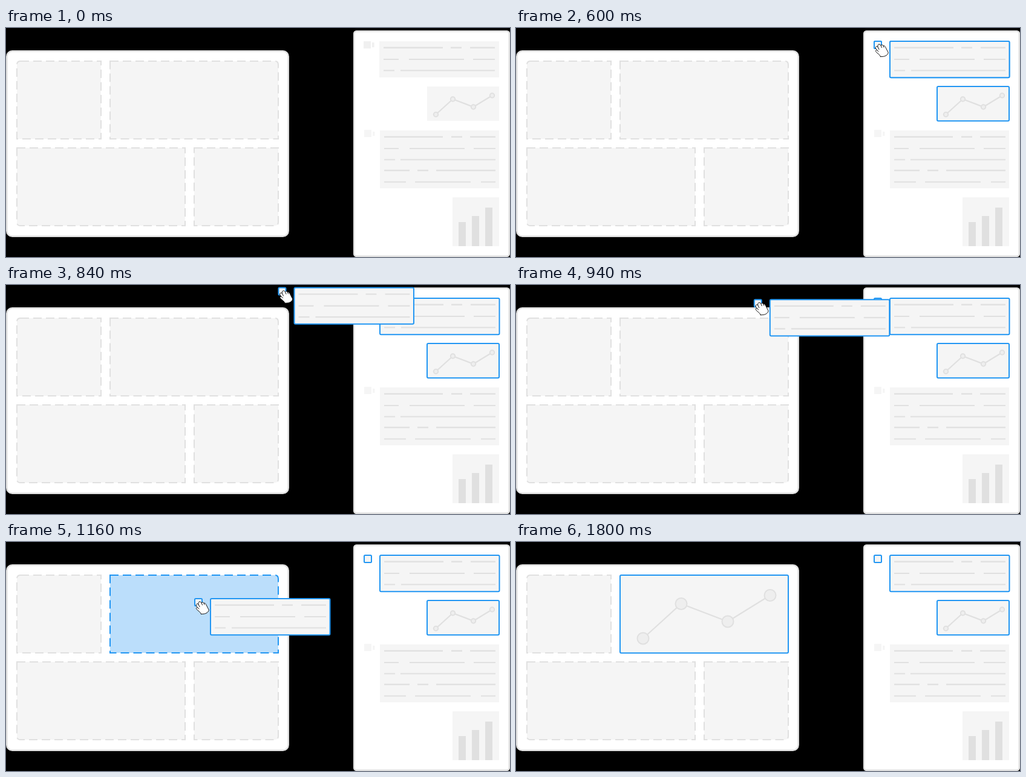
An HTML page that plays this animation: 833x380 px, repeating every 2.24 s.

```html
<!DOCTYPE html>
<html lang="en">
<head>
<meta charset="utf-8">
<title>Drag a chart into a layout</title>
<style>
  html, body { margin: 0; width: 100%; height: 100%; overflow: hidden; background: #000; }
  svg { display: block; width: 833px; height: 380px; }
  .panel { fill: #fff; stroke: #e0e0e0; stroke-width: 2.5; }
  .fill { fill: #f5f5f5; }
  .line { fill: none; stroke: #e0e0e0; stroke-width: 2.2; }
  .slot { fill: #f5f5f5; stroke: #e0e0e0; stroke-width: 2; stroke-dasharray: 14 7; }
  .slot.target { fill: #bbdefb; stroke: #2196f3; }
  .selected { fill: #f5f5f5; stroke: #2196f3; stroke-width: 2; }
  .node { fill: #eee; stroke: #e0e0e0; stroke-width: 2; }
  .bar { fill: #e0e0e0; }
  .hand { fill: #fff; stroke: #111; stroke-width: 1; stroke-linejoin: round; stroke-linecap: round; }
</style>
</head>
<body>
<svg viewBox="0 0 833 380">
  <defs>
    <path id="route" d="M0 0Q-170 -65 -280 72"/>
    <path id="textShort" class="line" d="M624 32.7h98m13 0h18m14 0h41M624 52h25m17 0h91m15 0h36M624 70.5h18m10 0h156"/>
    <g id="smallChart">
      <path class="line" d="M710.5 143.5L738.5 118L772.5 131L803.5 112"/>
      <g class="node">
        <circle cx="710.5" cy="143.5" r="3.7"/><circle cx="738.5" cy="118" r="3.7"/>
        <circle cx="772.5" cy="131" r="3.7"/><circle cx="803.5" cy="112" r="3.7"/>
      </g>
    </g>
    <g id="bundle">
      <rect class="selected" x="592" y="22" width="12" height="12" rx="1.5"/>
      <rect class="selected" x="618" y="22" width="197.5" height="60.3" rx="2"/>
      <use href="#textShort" x="1"/>
    </g>
    <g id="hand" class="hand" transform="translate(593 26)">
      <path d="M9.5 21.5C8.5 18 4 16 2 13.5C.5 11.5 2 10 4 11C2 9 .5 7 1.5 5.5C2.5 4 4 4.5 5 5.5C4.5 3 5.5 1 7 1C8.5 1 9.5 2 10 3C10.5 1.5 13 1.5 14 3.5C15 2.8 16.5 3.5 17.5 5.5C19.5 9 20 11 22 14C22.8 16 21 18 19 19.5C16 21.5 13 21.5 9.5 21.5Z"/>
      <path fill="none" d="M5 5.5L7 9.5M10 3L11.5 6.5M14 3.5L15 6M4 11L6 13"/>
    </g>
  </defs>

  <rect class="panel" x="1.3" y="38.3" width="465.4" height="307.4" rx="9"/>
  <path class="slot" d="M24 55H157V184H18V61Q18 55 24 55Z"/>
  <path id="slot" class="slot" d="M172 55H444Q450 55 450 61V184H172Z"/>
  <path class="slot" d="M18 199H296V328H24Q18 328 18 322Z"/>
  <path class="slot" d="M311 199H450V322Q450 328 444 328H311Z"/>

  <rect class="panel" x="575.2" y="5.2" width="256.6" height="373.6" rx="4"/>
  <g id="plain">
    <rect x="591" y="22" width="12" height="12" fill="#f0f0f0"/>
    <rect x="605" y="24" width="3.5" height="8" fill="#f0f0f0"/>
    <rect class="fill" x="617" y="22" width="198" height="60"/>
    <use href="#textShort"/>
    <rect class="fill" x="696" y="97" width="119" height="57"/>
  </g>
  <g id="picked">
    <use href="#bundle"/>
    <rect class="selected" x="696" y="97" width="119" height="57.3" rx="2"/>
  </g>
  <use href="#smallChart"/>

  <rect class="fill" x="592" y="169" width="12" height="12"/>
  <rect class="fill" x="606" y="172" width="3.5" height="7"/>
  <rect class="fill" x="618" y="170" width="197" height="96"/>
  <path class="line" d="M625 180.7h97m14 0h18m13 0h42M625 200h24m18 0h91m15 0h36M625 218.5h18m9 0h157M625 236.3h42m13 0h18m13 0h98M625 255.5h36m15 0h92m17 0h24"/>
  <rect class="fill" x="738" y="281" width="77" height="81"/>
  <path class="bar" d="M748 362v-40h12v40zM770 362v-50h12v50zM792 362v-64h12v64z"/>

  <g id="result">
    <rect x="170" y="53" width="282" height="133" fill="#fff"/>
    <rect class="selected" x="172" y="55" width="278" height="129.3" rx="2"/>
    <path class="line" d="M210 160L273 102.5L350 132L420 88.5"/>
    <g class="node">
      <circle cx="210" cy="160" r="9.5"/><circle cx="273" cy="102.5" r="9.5"/>
      <circle cx="350" cy="132" r="9.5"/><circle cx="420" cy="88.5" r="9.5"/>
    </g>
  </g>

  <!-- Everything that dissolves away after the drop -->
  <g id="outgoing">
    <g id="target">
      <rect x="170" y="53" width="282" height="133" fill="#fff"/>
      <path class="slot target" d="M172 55H444Q450 55 450 61V184H172Z"/>
    </g>
    <g id="drag">
      <use id="copy" href="#bundle"/>
      <use href="#hand"/>
    </g>
  </g>
</svg>
<script>
  const LOOP = 2240, STEP = 20;
  const CURSOR = 160, PICK = 320, DRAG = 600, ARRIVE = 1120, HOVER = 1160, DROP = 1300, DONE = 1800;
  const el = id => document.getElementById(id);
  const show = (id, visible) => el(id).setAttribute('display', visible ? 'inline' : 'none');
  const progress = (t, from, to) => Math.min(1, Math.max(0, (t - from) / (to - from)));
  const route = el('route'), routeLength = route.getTotalLength();

  function draw(t) {
    show('plain', t < PICK);
    show('picked', t >= PICK);
    show('result', t >= DROP);
    show('target', t >= HOVER);
    show('drag', t >= CURSOR);
    show('copy', t >= DRAG);
    const { x, y } = route.getPointAtLength(routeLength * progress(t, DRAG, ARRIVE));
    el('drag').setAttribute('transform', `translate(${x} ${y})`);
    el('outgoing').setAttribute('opacity', 1 - progress(t, DROP, DONE));
  }

  const start = performance.now();
  function tick() {
    const t = (performance.now() - start) % LOOP;
    draw(Math.floor(t / STEP) * STEP);
    requestAnimationFrame(tick);
  }
  tick();
</script>
</body>
</html>
```
